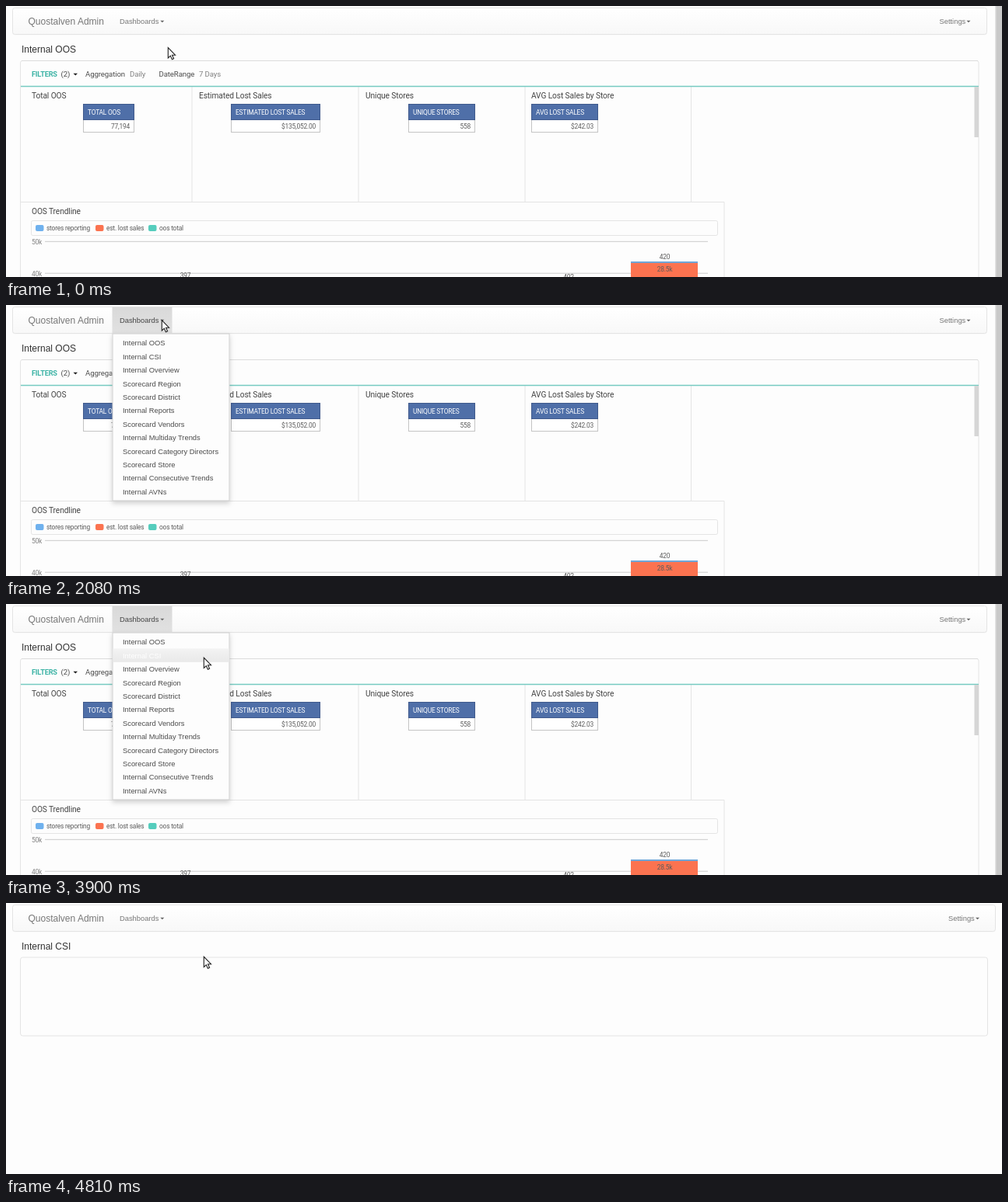
An HTML page for the animation above (4940 ms loop, 1280 by 349 pixels).

```html
<!DOCTYPE html>
<html lang="en">
<head>
<meta charset="utf-8">
<title>Dashboard menu</title>
<style>
  html, body { margin: 0; width: 100%; height: 100%; overflow: hidden; background: #fdfdfd; }
  svg { display: block; width: 100%; height: 100%; }
  text { font: 9.35px "Liberation Sans", Arial, sans-serif; fill: #333; }
  .brand { font-size: 12px; fill: #777; }
  .heading { font-size: 12px; }
  .nav { fill: #777; }
  .item { fill: #4c4c4c; }
  .chart { font-family: Roboto, sans-serif; font-size: 8.4px; letter-spacing: -.2px; fill: #5c5c5c; }
  .title { font-size: 10.2px; letter-spacing: -.1px; fill: #444; }
  .filter { font-size: 9.6px; letter-spacing: -.1px; fill: #4c4c4c; }
  .soft { fill: #808080; }
  .accent { fill: #3cb3a5; font-weight: 700; font-size: 9.2px; }
  .white { fill: #fff; }
  .end { text-anchor: end; }
  .mid { text-anchor: middle; }
  .line { fill: none; stroke: #e4e4e4; }
  .grid { stroke: #cbcbcb; }
  .faded .line { stroke: #fafafa; }
  .faded #rule { stroke: #b5d3cf; }
  .faded .accent { fill: #6f9fa3; }
  #rule { stroke: #76cac1; stroke-width: 1.6; }
</style>
</head>
<body>
<svg id="stage" viewBox="0 0 1280 349" preserveAspectRatio="none">
  <defs>
    <linearGradient id="barFill" x2="0" y2="1"><stop stop-color="#fff"/><stop offset="1" stop-color="#f8f8f8"/></linearGradient>
    <linearGradient id="openFill" x2="0" y2="1"><stop stop-color="#d9d9d9"/><stop offset="1" stop-color="#e1e1e1"/></linearGradient>
    <linearGradient id="hoverFill" x2="0" y2="1"><stop stop-color="#f3f3f3"/><stop offset="1" stop-color="#e9e9e9"/></linearGradient>
    <filter id="shadow" x="-10%" y="-10%" width="120%" height="120%">
      <feDropShadow dx="0" dy="3" stdDeviation="3" flood-opacity=".18"/>
    </filter>
  </defs>
</svg>
<script>
const LOOP = 4940, STEP = 130;
const MENU_OPEN = 1430, MENU_CLOSE = 4290, PAGE_SWAP = 4680;
const CLICKS = [1300, 4160];
const ITEM_TOP = 40, ITEM_HEIGHT = 17.4;
const items = ["Internal OOS", "Internal CSI", "Internal Overview", "Scorecard Region",
  "Scorecard District", "Internal Reports", "Scorecard Vendors", "Internal Multiday Trends",
  "Scorecard Category Directors", "Scorecard Store", "Internal Consecutive Trends", "Internal AVNs"];
// time, x, y of the pointer tip
const pointerPath = [[260, 208.3, 53.7], [1040, 200.3, 19.7], [2340, 200.3, 19.7],
  [2990, 208.8, 51.7], [3120, 208.8, 51.7], [3770, 254.3, 69.2]];

const text = (x, y, value, cls = "") => `<text x="${x}" y="${y}" class="${cls}">${value}</text>`;
const rect = (x, y, w, h, attrs) => `<rect x="${x}" y="${y}" width="${w}" height="${h}" ${attrs}/>`;
const path = (d, attrs = 'class="line"') => `<path d="${d}" ${attrs}/>`;
const caret = (x, y, size = 5, fill = "#666") =>
  path(`M${x} ${y}h${size}l${-size / 2} ${size / 2}z`, `fill="${fill}"`);

function card(x, width, titleX, title, label, value) {
  return text(titleX, 119, title, "chart title")
    + rect(x + .5, 146.5, width - 1, 16, 'fill="#fff" stroke="#c4c4c4"')
    + rect(x + .5, 126.5, width - 1, 20, 'fill="#4f6fa8" stroke="#405a8c"')
    + text(x + 6, 140.4, label, "chart white")
    + text(x + width - 6, 158, value, "chart end");
}

const legend = (x, color, label) =>
  rect(x, 282, 10.5, 8, `rx="2" fill="${color}"`) + text(x + 14, 289, label, "chart");

const report = `
  ${path("M18.5 349V73q0-2.5 2.5-2.5H1247.5q2.5 0 2.5 2.5V349")}
  ${path("M20 70.5H1249", 'stroke="#dcdcdc"')}
  ${text(33, 91, "FILTERS", "chart accent")}${text(70.5, 91, "(2)", "chart filter")}
  ${caret(86.5, 86.8, 5.5, "#222")}
  ${text(102, 91, "Aggregation", "chart filter")}${text(159, 91, "Daily", "chart filter soft")}
  ${text(196.5, 91, "DateRange", "chart filter")}${text(248, 91, "7 Days", "chart filter soft")}
  ${path("M239 104V252M453 104V252M667 104V252M880.5 104V252M19 252.5H923V349")}
  ${path("M19 103.5H1250", 'id="rule"')}
  ${rect(1244.5, 104, 5.5, 65, 'fill="#d6d6d6"')}
  ${card(99, 66, 33, "Total OOS", "TOTAL OOS", "77,194")}
  ${card(289, 115, 248, "Estimated Lost Sales", "ESTIMATED LOST SALES", "$135,052.00")}
  ${card(517, 86, 462, "Unique Stores", "UNIQUE STORES", "558")}
  ${card(675, 86, 675, "AVG Lost Sales by Store", "AVG LOST SALES", "$242.03")}
  ${text(33, 268.3, "OOS Trendline", "chart title")}
  ${rect(32.5, 276.5, 882, 19, 'class="line" rx="2"')}
  ${legend(38, "#6fb1ee", "stores reporting")}${legend(115, "#fb7350", "est. lost sales")}${legend(183, "#55cdbd", "oos total")}
  ${text(33, 307, "50k", "chart soft")}${text(33, 348, "40k", "chart soft")}
  ${path("M50 303.3H902M50 344.2H902", 'class="grid"')}
  ${text(230.5, 350, "397", "chart mid")}${text(723, 352, "402", "chart mid")}
  ${rect(803, 329, 86, 2, 'fill="#6fa6d8"')}${rect(803, 331, 86, 18, 'fill="#fb7350"')}
  ${text(846.5, 326.3, "420", "chart mid")}${text(846.5, 342.3, "28.5k", "chart mid")}
  ${rect(1271, 0, 9, 349, 'fill="#c9c9c9"')}${rect(1271, 0, 1.5, 349, 'fill="#e2e2e2"')}`;

const menu = rect(137, 37, 150, 215, 'fill="#fdfdfd" stroke="#cfcfcf" filter="url(#shadow)"')
  + rect(137.5, 0, 149, ITEM_HEIGHT, 'id="hover" fill="url(#hoverFill)"')
  + items.map((label, i) => text(150, 52.3 + i * ITEM_HEIGHT, label, "item")).join("");

const $ = id => document.getElementById(id);
$("stage").insertAdjacentHTML("beforeend", `
  ${rect(0, 0, 1280, 349, 'fill="#fdfdfd"')}
  ${rect(8.5, 3.5, 1252, 34, 'id="barShadow" rx="3" fill="#000" opacity=".035"')}
  ${rect(8.5, 2.5, 1252, 34, 'id="bar" class="line" rx="3" style="fill:url(#barFill)"')}
  ${rect(136.5, 2.5, 77, 34, 'id="opened" fill="url(#openFill)"')}
  ${rect(136.5, 2.5, 77, 33, 'id="focus" fill="none" stroke="#86a9d6"')}
  ${text(28.5, 23.7, "Quostalven Admin", "brand")}
  <g id="toggle">${text(146, 22.8, "Dashboards", "nav")}${caret(198.3, 18.8)}</g>
  <g id="settings">${text(1199.5, 22.8, "Settings", "nav")}${caret(1234.5, 18.8)}</g>
  <text id="heading" class="heading" x="20" y="60.2"></text>
  <g id="report">${report}</g>
  <g id="blank">${rect(18.5, 70, 1243, 101, 'class="line" rx="3"')}</g>
  <g id="menu">${menu}</g>
  <circle id="ring" fill="none"/>
  <path id="pointer" d="M0 0V13.2L3 10.4L5.1 15L7.3 14L5.2 9.5H9.2Z" fill="#fff" stroke="#222" stroke-width="1.1"/>`);

const labels = document.querySelectorAll(".item");
const show = (id, visible) => $(id).style.display = visible ? "" : "none";

function pointerAt(t) {
  const next = pointerPath.findIndex(key => key[0] > t);
  if (next === 0) return pointerPath[0].slice(1);
  if (next < 0) return pointerPath.at(-1).slice(1);
  const [t0, x0, y0] = pointerPath[next - 1], [t1, x1, y1] = pointerPath[next];
  const p = (t - t0) / (t1 - t0), eased = p * p * (3 - 2 * p);
  return [x0 + (x1 - x0) * eased, y0 + (y1 - y0) * eased];
}

function render(t) {
  const [x, y] = pointerAt(t);
  const open = t >= MENU_OPEN && t < MENU_CLOSE;
  const swapped = t >= PAGE_SWAP;
  const closing = t >= MENU_CLOSE && t < MENU_CLOSE + STEP;
  const barWidth = swapped ? 1263 : 1252;

  $("stage").classList.toggle("faded", closing);
  $("bar").setAttribute("width", barWidth);
  $("barShadow").setAttribute("width", barWidth);
  $("settings").setAttribute("transform", `translate(${swapped ? 11.5 : 0})`);
  $("heading").textContent = items[swapped ? 1 : 0];
  show("barShadow", !closing);
  show("report", !swapped);
  show("blank", swapped);
  show("menu", open);
  show("opened", open);
  show("focus", t >= CLICKS[0] && t < MENU_OPEN);
  $("toggle").firstChild.style.fill = open || (y < 36 && t < MENU_OPEN) ? "#444" : "";

  const hovered = Math.floor((y - ITEM_TOP) / ITEM_HEIGHT);
  show("hover", hovered >= 0);
  $("hover").setAttribute("y", ITEM_TOP + hovered * ITEM_HEIGHT);
  labels.forEach((label, i) => label.classList.toggle("white", i === hovered));

  // The click ring shrinks around the pointer tip.
  const click = CLICKS.find(start => t >= start && t < start + 2 * STEP);
  show("ring", click !== undefined);
  if (click !== undefined) {
    const ring = { cx: x + 1, cy: y + .5, r: 21 - 10 * (t - click) / STEP,
      stroke: closing ? "#a99" : "#d6616b", "stroke-width": closing ? 1.8 : 2.4 };
    for (const name in ring) $("ring").setAttribute(name, ring[name]);
  }
  $("pointer").setAttribute("transform", `translate(${x} ${y})`);
}

const begin = performance.now();
function frame() {
  const t = (performance.now() - begin) % LOOP;
  render(Math.floor(t / STEP) * STEP);
  requestAnimationFrame(frame);
}
frame();
</script>
</body>
</html>
```
